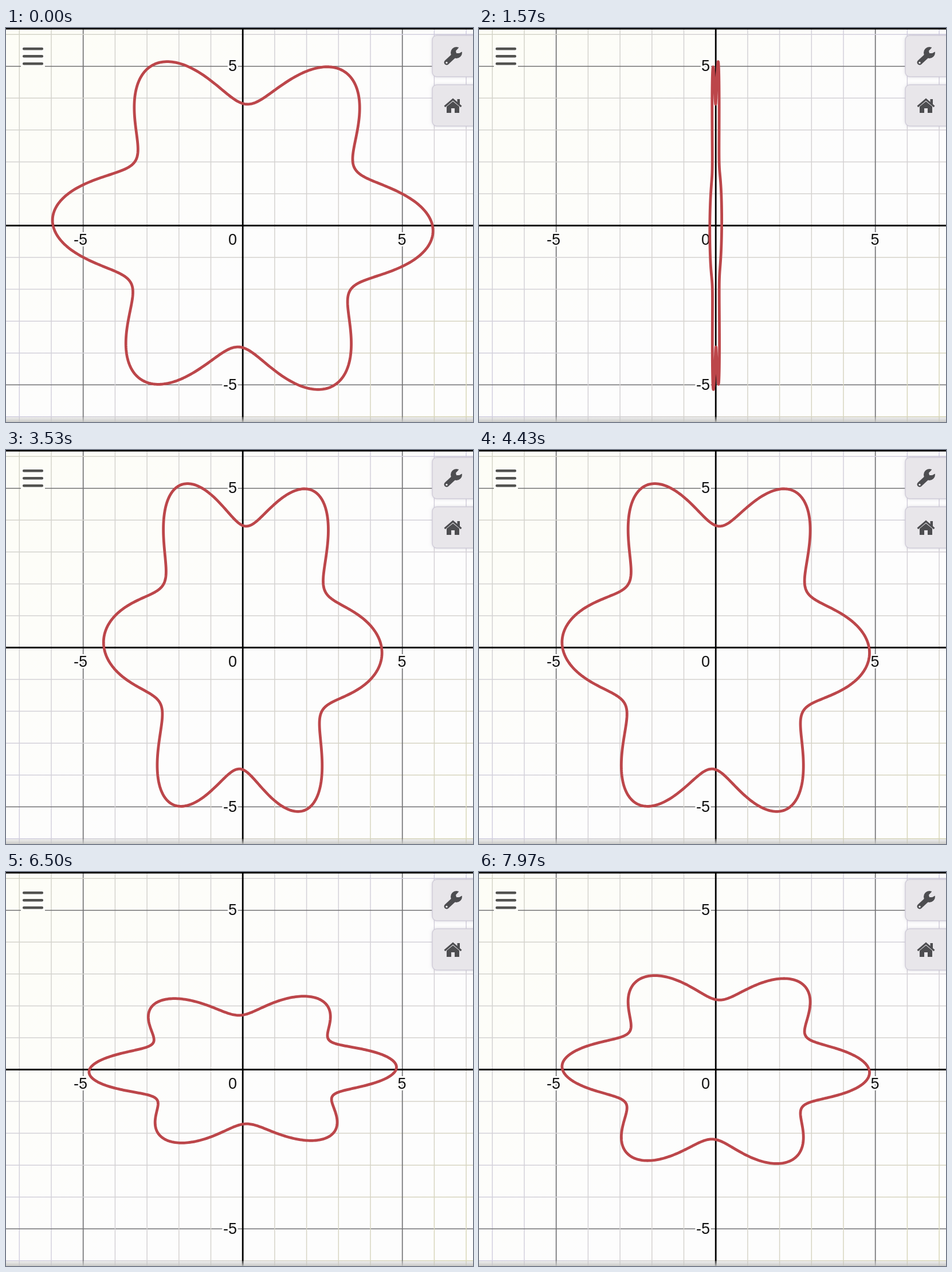
An HTML page with a canvas for the animation above (8000 ms loop, 815 px wide and 687 px high).

```html
<!DOCTYPE html>
<html lang="en">
<head>
<meta charset="utf-8">
<title>Graph</title>
<style>
html, body { margin: 0; width: 100%; height: 100%; overflow: hidden; background: #fff; }
canvas { display: block; }
</style>
</head>
<body>
<canvas id="stage" width="815" height="687"></canvas>
<script>
const W = 815, H = 687, LOOP = 8000;
const CX = 413.2, CY = 344.5, UX = 55.7, UY = 55.55;
const ctx = document.getElementById('stage').getContext('2d');

// Angle of each squash over time: [ms, radians].
const xTurn = [[0, -0.11], [700, -0.11], [1570, 1.6], [2700, 3.861], [3590, 5.645]];
const yTurn = [[0, -0.308], [4530, -0.308], [5630, 2.11], [6500, 4.27], [8000, 7.335]];

const lerp = (a, b, k) => a + (b - a) * k;

function along(keys, t) {
  for (let i = 1; i < keys.length; i++) {
    const [t0, v0] = keys[i - 1], [t1, v1] = keys[i];
    if (t < t1) return lerp(v0, v1, (t - t0) / (t1 - t0));
  }
  return keys[keys.length - 1][1];
}

// Grid tint at a point, blended from the four corners.
const corners = [[212, 212, 198], [210, 206, 226], [210, 207, 226], [217, 215, 180]];
function tint(x, y) {
  const u = x / W, v = y / H;
  const mix = [0, 1, 2].map(i => Math.round(lerp(
    lerp(corners[0][i], corners[1][i], u),
    lerp(corners[2][i], corners[3][i], u), v)));
  return `rgb(${mix})`;
}

function segment(c, x0, y0, x1, y1, style, width) {
  c.strokeStyle = style;
  c.lineWidth = width;
  c.beginPath();
  c.moveTo(x0, y0);
  c.lineTo(x1, y1);
  c.stroke();
}

function gridLine(c, x0, y0, x1, y1, major) {
  let style = '#727274';
  if (!major) {
    style = c.createLinearGradient(x0, y0, x1, y1);
    style.addColorStop(0, tint(x0, y0));
    style.addColorStop(1, tint(x1, y1));
  }
  segment(c, x0, y0, x1, y1, style, major ? 1.7 : 1.5);
}

function label(c, text, x, y, align) {
  c.font = '27px "Liberation Sans", Arial, sans-serif';
  c.textAlign = align;
  c.lineJoin = 'round';
  c.lineWidth = 6;
  c.strokeStyle = '#fdfdfc';
  c.strokeText(text, x, y);
  c.fillStyle = '#111';
  c.fillText(text, x, y);
}

function layer(paint) {
  const canvas = document.createElement('canvas');
  canvas.width = W;
  canvas.height = H;
  paint(canvas.getContext('2d'));
  return canvas;
}

const paper = layer(c => {
  const sheet = c.createLinearGradient(0, 0, 420, 420);
  sheet.addColorStop(0, '#fdfdf6');
  sheet.addColorStop(1, '#fdfdfd');
  c.fillStyle = sheet;
  c.fillRect(0, 0, W, H);

  for (let i = -7; i <= 7; i++) {
    if (i === 0) continue;
    const x = CX + i * UX, y = CY - i * UY;
    const major = Math.abs(i) === 5;
    gridLine(c, x, 0, x, H, major);
    gridLine(c, 0, y, W, y, major);
  }
  segment(c, CX, 0, CX, H, '#000', 2.8);
  segment(c, 0, CY, W, CY, '#000', 2.8);

  label(c, '-5', 130, 378, 'center');
  label(c, '5', 691, 378, 'center');
  label(c, '0', 403, 378, 'right');
  label(c, '5', 403, 75, 'right');
  label(c, '-5', 403, 631, 'right');
});

const ink = '#4d4d50', face = '#e8e6ea';

function button(c, y) {
  c.save();
  c.shadowColor = 'rgba(150,145,165,0.35)';
  c.shadowBlur = 6;
  c.fillStyle = face;
  c.beginPath();
  c.roundRect(744, y, 90, 72, 8);
  c.fill();
  c.restore();
  c.strokeStyle = '#d1cdd9';
  c.lineWidth = 1.5;
  c.stroke();
}

function polygon(c, points, color) {
  c.fillStyle = color;
  c.beginPath();
  points.forEach(([x, y]) => c.lineTo(x, y));
  c.fill();
}

function disc(c, x, y, r, color) {
  c.fillStyle = color;
  c.beginPath();
  c.arc(x, y, r, 0, 7);
  c.fill();
}

const controls = layer(c => {
  // Menu
  c.fillStyle = '#fdfdf9';
  c.fillRect(26, 31, 42, 37);
  c.fillStyle = '#525250';
  for (const y of [34, 47, 60]) {
    c.beginPath();
    c.roundRect(29, y, 36, 4.5, 2);
    c.fill();
  }

  // Wrench
  button(c, 13);
  c.lineCap = 'round';
  segment(c, 769, 60, 783, 47, ink, 9);
  disc(c, 786, 43, 10, ink);
  polygon(c, [[785, 40], [793, 31], [800, 39], [791, 44], [786, 44]], face);
  disc(c, 769, 60.5, 1.7, face);

  // House
  button(c, 99);
  c.lineCap = 'butt';
  c.lineJoin = 'miter';
  c.strokeStyle = ink;
  c.lineWidth = 3;
  c.beginPath();
  c.moveTo(765.5, 137);
  c.lineTo(780, 124.5);
  c.lineTo(794.5, 137);
  c.stroke();
  c.fillStyle = ink;
  c.fillRect(787.5, 124, 4.5, 9);
  polygon(c, [[769, 137], [780, 128], [791, 137], [791, 148], [783, 148],
    [783, 140], [777, 140], [777, 148], [769, 148]], ink);

  // Window edges
  c.fillStyle = '#000';
  c.fillRect(0, 0, W, 2.6);
  const shade = c.createLinearGradient(0, 678, 0, H);
  shade.addColorStop(0, 'rgba(200,200,200,0.25)');
  shade.addColorStop(1, 'rgba(195,195,192,0.9)');
  c.fillStyle = shade;
  c.fillRect(0, 678, W, 9);
});

function drawCurve(sx, sy) {
  const steps = 720, tilt = 0.034;
  ctx.beginPath();
  for (let i = 0; i < steps; i++) {
    const a = i / steps * Math.PI * 2;
    const r = 5 + Math.cos(6 * (a + tilt));
    ctx.lineTo(CX + sx * r * Math.cos(a) * UX, CY - sy * r * Math.sin(a) * UY);
  }
  ctx.closePath();
  ctx.lineJoin = 'round';
  ctx.lineWidth = 4.8;
  ctx.strokeStyle = '#bc464a';
  ctx.stroke();
}

const start = performance.now();

function frame() {
  const t = (performance.now() - start) % LOOP;
  ctx.drawImage(paper, 0, 0);
  drawCurve(Math.cos(along(xTurn, t)), Math.cos(along(yTurn, t)));
  ctx.drawImage(controls, 0, 0);
  requestAnimationFrame(frame);
}
frame();
</script>
</body>
</html>
```
